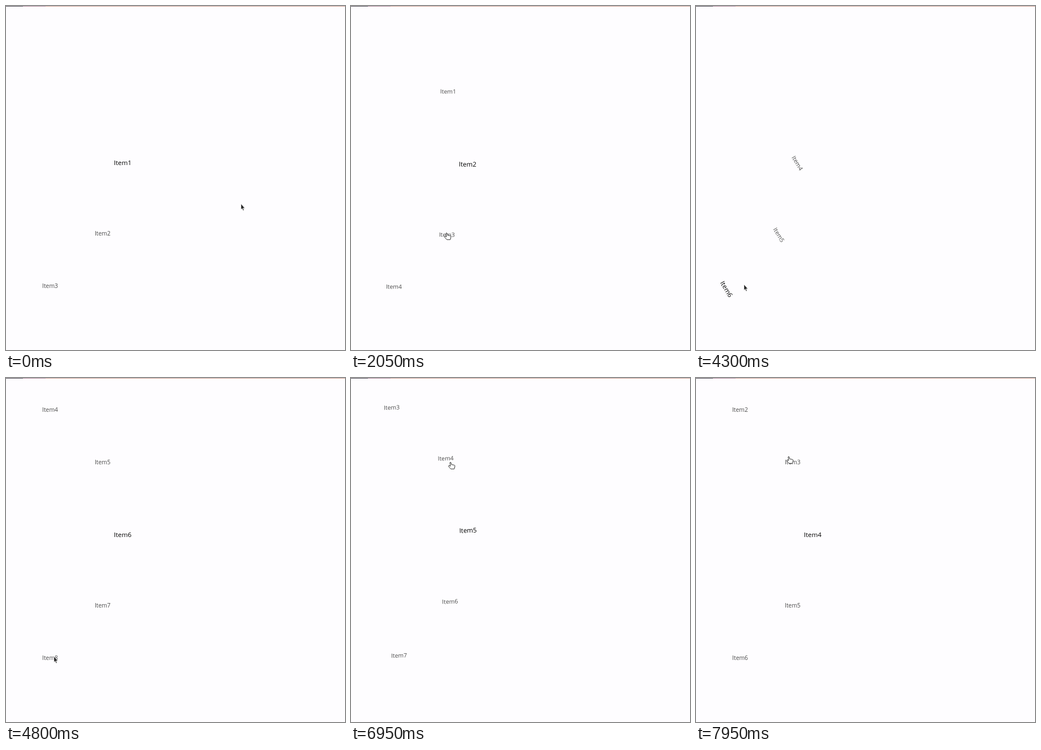
Write an HTML page that moves like this. It is 600 by 610 pixels and loops after 8 s.

```html
<!DOCTYPE html>
<html lang="en">
<head>
<meta charset="utf-8">
<title>Item wheel</title>
<style>
  html, body { margin: 0; width: 100%; height: 100%; overflow: hidden; background: #fefdff; }
  svg { display: block; width: 600px; height: 610px; }
  text { font: 500 10.4px "Open Sans", "Noto Sans", sans-serif; fill: #4c4c4c; }
  text.selected { font-size: 11.5px; fill: #000; }
</style>
</head>
<body>
<svg viewBox="0 0 600 610">
  <rect width="600" height="1" fill="#d2a498"/>
  <rect width="30" height="1" fill="#55505a"/>
  <rect x="30" width="40" height="1" fill="#b08c9c"/>
  <g id="wheel"></g>
  <g id="cursor" stroke-linejoin="round">
    <path id="arrow" d="M0 0V9.8L2.1 7.9 3.7 11.7 5.2 11 3.6 7.4H6.6Z" fill="#222" stroke="#fff" stroke-width=".5"/>
    <path id="hand" d="M-1 1Q0-.2 1 1L1.8 4.6 6.4 5.3Q8 5.6 7.9 7.2L7.4 10 6.7 12.3H.6L-3.3 7.8Q-3.6 6-2 6.2L0 7.4Z" fill="#fff" stroke="#333"/>
  </g>
</svg>
<script>
const LOOP = 8000, FRAME = 50, STEP = 30, TURN = 500, RADIUS = 254;
const CENTER = { x: -63, y: 280.2 }, PIVOT = "-66,256.4";
const NEAR = 15; // px around a stop in which the pointer keeps that stop's shape

// at: the new layout appears; start: it begins to turn; steps: items moved on
const TURNS = [
  { at: 0, start: 0, steps: 0 },
  { at: 1650, start: 1633, steps: 1 },
  { at: 3100, start: 3099, steps: 2 },
  { at: 4250, start: 4290, steps: 2 },
  { at: 6650, start: 6597, steps: -1 },
  { at: 7500, start: 7465, steps: -1 }
];

const MOVES = [
  { from: 0, to: 1, x: 416, y: 351, shape: "arrow" },
  { from: 600, to: 1250, x: 169, y: 402, shape: "hand" },
  { from: 2130, to: 2650, x: 66, y: 495, shape: "hand" },
  { from: 3600, to: 3900, x: 95, y: 488, shape: "arrow" },
  { from: 3900, to: 4100, x: 85, y: 494, shape: "hand" },
  { from: 4249, to: 4250, x: 85, y: 494, shape: "arrow" },
  { from: 5100, to: 5550, x: 182, y: 223, shape: "arrow" },
  { from: 5750, to: 6200, x: 176, y: 149, shape: "hand" },
  { from: 7190, to: 7450, x: 164, y: 139, shape: "hand" }
];

const byId = id => document.getElementById(id);
const wheel = byId("wheel"), cursor = byId("cursor");

const labels = [-2, -1, 0, 1, 2].map(slot => {
  const node = document.createElementNS("http://www.w3.org/2000/svg", "text");
  const angle = slot * STEP * Math.PI / 180;
  node.setAttribute("x", CENTER.x + RADIUS * Math.cos(angle));
  node.setAttribute("y", CENTER.y + RADIUS * Math.sin(angle) + (slot ? 0 : 2.2));
  if (!slot) node.classList.add("selected");
  wheel.append(node);
  return { node, slot };
});

const clamp = v => Math.min(1, Math.max(0, v));
const mix = (a, b, k) => a + (b - a) * k;
const bezier = (a, b, u) => 3 * a * u * (1 - u) ** 2 + 3 * b * u * u * (1 - u) + u ** 3;

// Same curve as the CSS keyword "ease"
function ease(x) {
  let low = 0, high = 1;
  for (let i = 0; i < 24; i++) {
    const mid = (low + high) / 2;
    if (bezier(.25, .25, mid) < x) low = mid; else high = mid;
  }
  return bezier(.1, 1, low);
}

function drawWheel(t) {
  const done = TURNS.filter(turn => turn.at <= t);
  const { start, steps } = done.at(-1);
  const item = done.reduce((sum, turn) => sum + turn.steps, 1);
  const angle = STEP * steps * (1 - ease(clamp((t - start) / TURN)));
  wheel.setAttribute("transform", `rotate(${angle},${PIVOT})`);
  for (const { node, slot } of labels) {
    const number = item + slot;
    node.textContent = number > 0 ? "Item" + number : "";
  }
}

function drawCursor(t) {
  const n = MOVES.findLastIndex(move => move.from <= t);
  const end = MOVES[n], origin = MOVES[n - 1] ?? end;
  const p = clamp((t - end.from) / (end.to - end.from)), k = p * p * (3 - 2 * p);
  const x = mix(origin.x, end.x, k), y = mix(origin.y, end.y, k);
  const isNear = stop => Math.hypot(x - stop.x, y - stop.y) < NEAR;
  const shape = isNear(end) ? end.shape : isNear(origin) ? origin.shape : "arrow";
  cursor.setAttribute("transform", `translate(${x},${y})`);
  for (const path of cursor.children) path.style.display = path.id === shape ? "" : "none";
}

const begin = performance.now();
function tick() {
  const elapsed = (performance.now() - begin) % LOOP;
  const t = Math.floor(elapsed / FRAME) * FRAME;
  drawWheel(t);
  drawCursor(t);
  requestAnimationFrame(tick);
}
tick();
</script>
</body>
</html>
```
